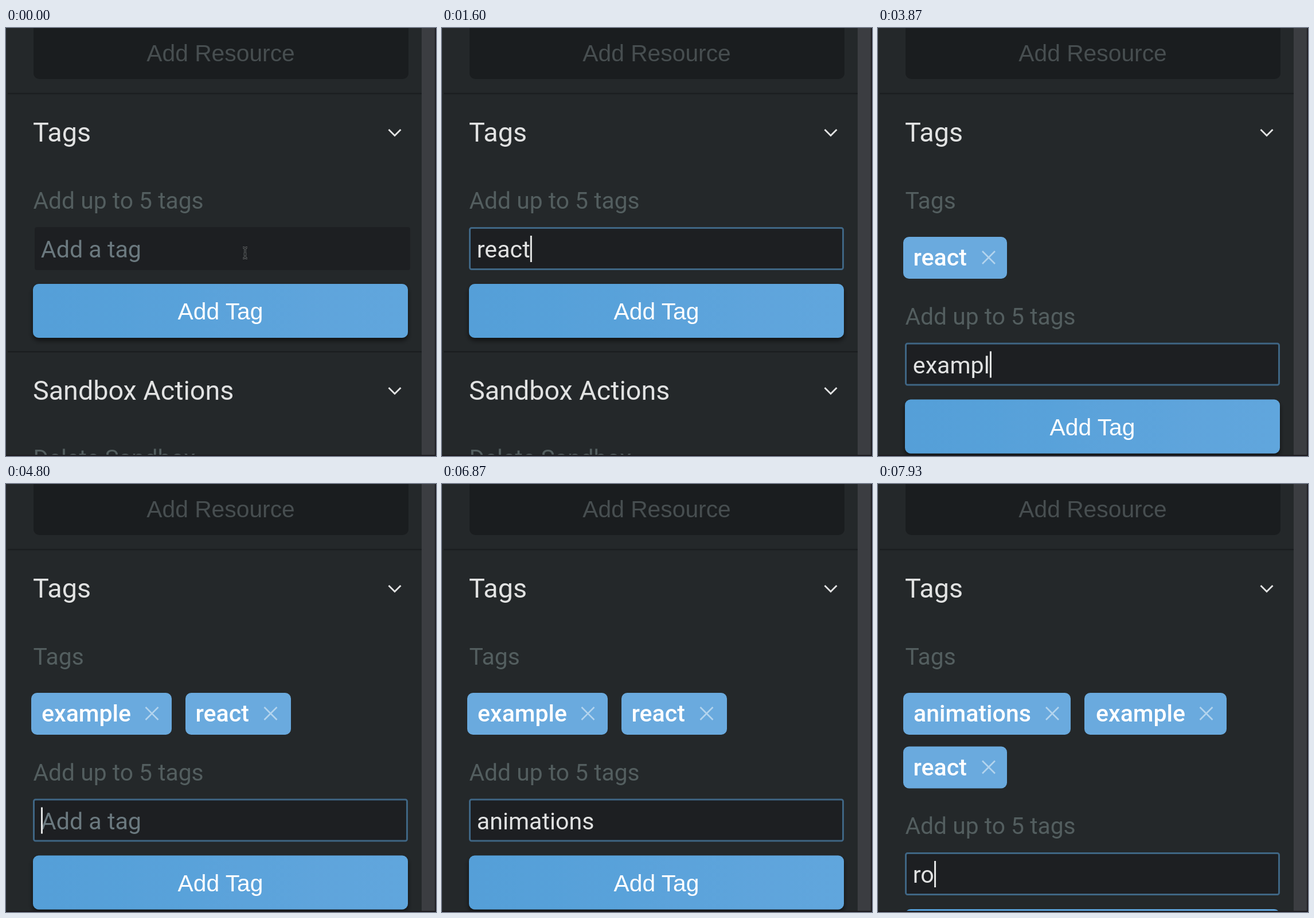
Animation of 750 by 746 pixels, one loop 8000 ms. Source, as an HTML page:

```html
<!DOCTYPE html>
<html lang="en">
<head>
<meta charset="utf-8">
<title>Adding tags</title>
<style>
  html, body { margin: 0; width: 100%; height: 100%; overflow: hidden; background: #24282a; }
  svg { display: block; width: 100%; height: 100%; }
  text { font-family: Roboto, sans-serif; font-size: 40.8px; white-space: pre; }
  .heading { font-size: 46.7px; fill: #e1e2e2; }
  .label { fill: #535e5f; }
  .button { font-family: "Liberation Sans", Arial, sans-serif; font-size: 40.8px; text-anchor: middle; }
  .input { font-size: 41.2px; }
  .chip { font-size: 41px; font-weight: 500; fill: #fff; }
  .line { fill: none; stroke-width: 3; }
</style>
</head>
<body>
<svg viewBox="0 0 750 746">
  <defs>
    <linearGradient id="blue">
      <stop offset="0" stop-color="#549fd8"/>
      <stop offset="1" stop-color="#61a6dd"/>
    </linearGradient>
    <filter id="shadow" x="-5%" y="-20%" width="110%" height="150%">
      <feDropShadow dx="0" dy="5" stdDeviation="4" flood-color="#000" flood-opacity=".55"/>
    </filter>
  </defs>
  <rect width="750" height="746" fill="#24282a"/>

  <rect x="48" y="-10" width="654" height="99" rx="10" fill="#1a1d1f"/>
  <text class="button" x="374.5" y="58" fill="#474e50">Add Resource</text>
  <rect x="3" y="113" width="722" height="2.5" fill="#1b1e20"/>
  <text class="heading" x="47" y="198">Tags</text>
  <path class="line" d="M667.5 177L678 187.5L688.5 177" stroke="#e1e2e2"/>

  <g id="tags">
    <text class="label" x="47.5" y="315">Tags</text>
    <g id="chips"></g>
  </g>

  <g id="form">
    <text class="label" x="47.5" y="315">Add up to 5 tags</text>
    <rect id="field" y="347" height="75" rx="4" fill="#1d1f22"/>
    <rect id="focus" class="line" x="48.5" y="348.5" width="651" height="72" rx="3" stroke="#3f6684"/>
    <text id="value" class="input" x="60.8" y="400"></text>
    <rect id="caret" y="362" width="3" height="46" fill="#e4e5e5"/>
    <rect x="47" y="446" width="654" height="94" rx="10" fill="url(#blue)" filter="url(#shadow)"/>
    <text class="button" x="374" y="508" fill="#fff">Add Tag</text>
    <rect x="3" y="563" width="722" height="2.5" fill="#1b1e20"/>
    <text class="heading" x="47" y="648">Sandbox Actions</text>
    <path class="line" d="M667.5 627L678 637.5L688.5 627" stroke="#e1e2e2"/>
    <text class="label" x="47.5" y="764">Delete Sandbox</text>
  </g>

  <g id="pointer" fill="none">
    <path id="beam" d="M413 382.5q4 0 4 3v13q0 3-4 3M421 382.5q-4 0-4 3v13q0 3 4 3M414.5 394h5" stroke="#7b7e80" stroke-width="3"/>
    <path d="M413 382.5q4 0 4 3v13q0 3-4 3M421 382.5q-4 0-4 3v13q0 3 4 3M414.5 394h5" stroke="#151718" stroke-width="1.4"/>
  </g>

  <rect x="725" width="23" height="746" fill="#3b3d41"/>
  <rect x="748" width="2" height="746" fill="#1f1e23"/>
  <rect y="744" width="750" height="2" fill="#1c1a1f"/>
</svg>
<script>
const LOOP = 8000, FOCUS = 450, BLINK = 500;
const byId = id => document.getElementById(id);
const [tags, chips, form, field, focusRing, value, caret, pointer] =
  ["tags", "chips", "form", "field", "focus", "value", "caret", "pointer"].map(byId);

// Each word: first keystroke, time per key, and submission time.
const words = [
  { text: "react", start: 900, step: 140, submit: 1960 },
  { text: "example", start: 3060, step: 150, submit: 4600 },
  { text: "animations", start: 5080, step: 130, submit: 7200 },
  { text: "ro", start: 7730, step: 130, submit: Infinity }
];

// Chip: label, left edge, right edge, text start, cross centre, row.
const layouts = [
  { shift: 0, chips: [] },
  { shift: 201.5, chips: [["react", 44, 225, 61.5, 193, 0]] },
  { shift: 201.5, chips: [["example", 44, 289, 62, 254.5, 0], ["react", 313, 497, 330.5, 461.5, 0]] },
  { shift: 295, chips: [["animations", 44, 336, 62, 304, 0], ["example", 360, 608, 380, 572.5, 0],
                        ["react", 44, 225, 61.5, 193, 1]] }
];

const chipMarkup = ([label, left, right, textX, crossX, row]) => `
  <g transform="translate(0 ${row * 93.5})">
    <rect x="${left}" y="364" width="${right - left}" height="73" rx="10" fill="#6aaade"/>
    <text class="chip" x="${textX}" y="414">${label}</text>
    <path class="line" d="M${crossX - 11} 389l22 22m0-22l-22 22" stroke="#b3d4ee" style="stroke-width:2.6"/>
  </g>`;

const show = (node, visible) => node.setAttribute("visibility", visible ? "visible" : "hidden");

let shownCount = -1;
function showLayout(count) {
  if (count === shownCount) return;
  shownCount = count;
  chips.innerHTML = layouts[count].chips.map(chipMarkup).join("");
  form.setAttribute("transform", `translate(0 ${layouts[count].shift})`);
  show(tags, count > 0);
}

function draw(t) {
  const count = words.filter(word => t >= word.submit).length;
  const { text, start, step } = words[count];
  const typed = Math.max(0, Math.min(text.length, Math.floor((t - start) / step) + 1));
  const focused = t >= FOCUS;
  const lastEdit = typed ? start + (typed - 1) * step
    : count ? words[count - 1].submit : FOCUS;

  showLayout(count);
  value.textContent = typed ? text.slice(0, typed) : "Add a tag";
  value.setAttribute("fill", typed ? "#e1e2e2" : "#6b797f");
  field.setAttribute("x", focused ? 47 : 50);
  field.setAttribute("width", focused ? 654 : 655);
  show(focusRing, focused);
  caret.setAttribute("x", 61 + (typed ? value.getComputedTextLength() : 0));
  show(caret, focused && (t - lastEdit) % (2 * BLINK) < BLINK);
  show(pointer, t < words[0].start);
}

const origin = performance.now();
function tick() {
  draw((performance.now() - origin) % LOOP);
  requestAnimationFrame(tick);
}
tick();
</script>
</body>
</html>
```
